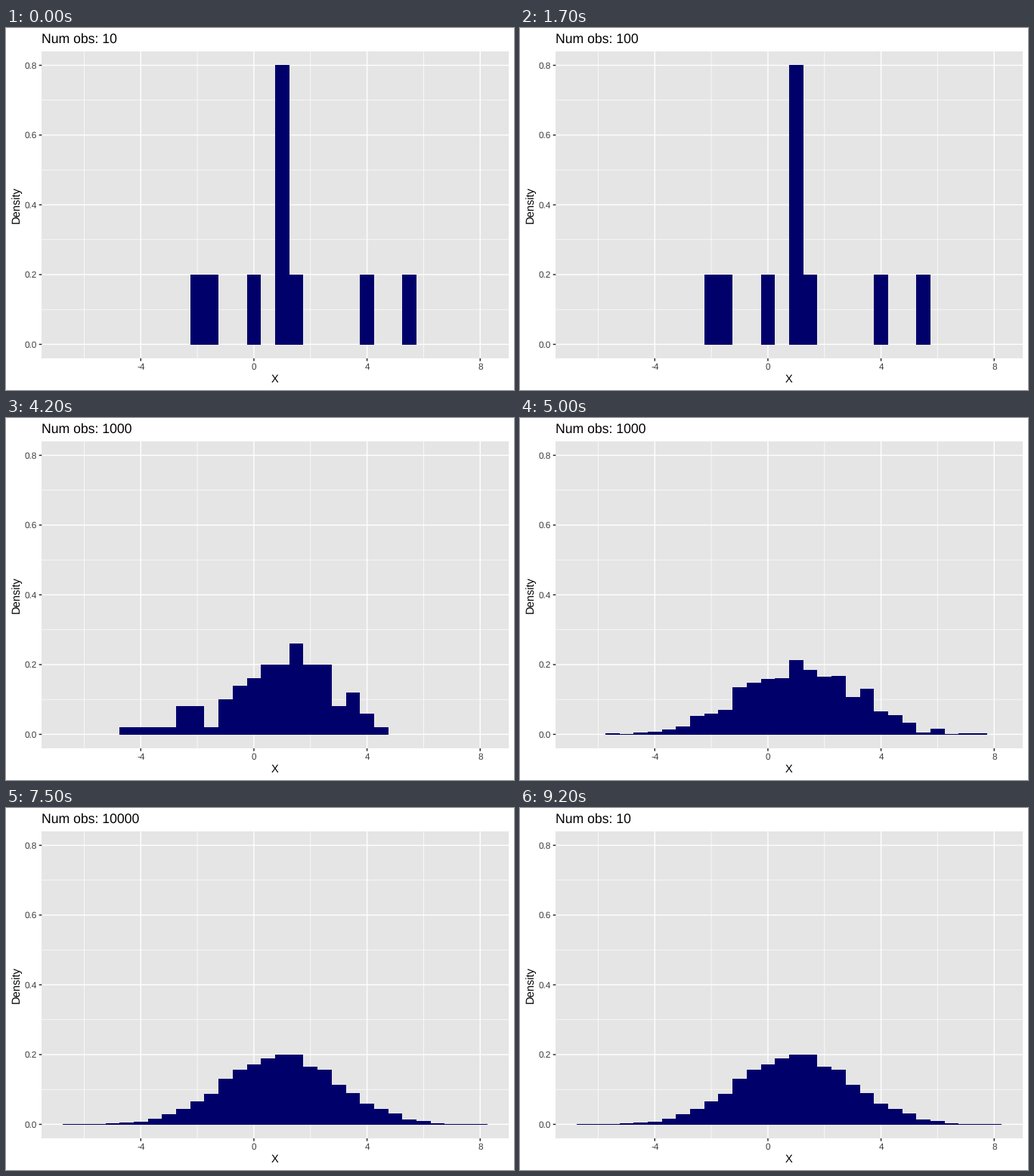
Animation, 672 px wide and 480 px high, one loop 10 s. Source, as a matplotlib script:

```python
import matplotlib.pyplot as plt
from matplotlib.animation import FuncAnimation
from matplotlib.collections import PolyCollection
from matplotlib.patches import Rectangle

WIDTH, HEIGHT, DPI = 672, 480, 96
STEP_MS, LOOP_MS = 100, 10000
LEFT, RIGHT, TOP, BOTTOM = 47, 665, 31, 438
BIN = 0.5
NAVY, PANEL, TICK, LABEL = "#00006b", "#e5e5e5", "#222222", "#3c3c3c"

plt.rcParams["font.family"] = "Liberation Sans"
plt.rcParams["text.hinting"] = "none"

# Sample size, centre of the first bin, observations per bin
SAMPLES = [
    (10, -2, [1, 1, 0, 0, 1, 0, 4, 1, 0, 0, 0, 0, 1, 0, 0, 1]),
    (100, -4.5, [1, 1, 1, 1, 4, 4, 1, 5, 7, 8, 10, 10, 13, 10, 10, 4, 6, 3, 1]),
    (1000, -5.5, [2, 1, 3, 4, 7, 11, 26, 30, 35, 68, 74, 79, 81, 106, 92, 83,
                  84, 53, 65, 33, 28, 17, 3, 8, 1, 2, 2]),
    (10000, -6.5, [3, 4, 8, 15, 25, 40, 80, 145, 225, 330, 440, 655, 785, 860,
                   945, 1000, 1000, 825, 785, 570, 450, 300, 225, 155, 70, 50,
                   15, 5, 5, 2]),
]
TITLE_CHANGES = [1700, 4200, 6700, 9200]


def px(x):
    return 327.95 + 37.413 * x


def py(density):
    return 419.47 - 462.5 * density


fig = plt.figure(figsize=(WIDTH / DPI, HEIGHT / DPI), dpi=DPI, facecolor="white")
ax = fig.add_axes([0, 0, 1, 1])
ax.set_xlim(0, WIDTH)
ax.set_ylim(HEIGHT, 0)
ax.axis("off")


def line(xs, ys, width, color, zorder):
    ax.plot(xs, ys, color=color, lw=width * 72 / DPI, zorder=zorder,
            solid_capstyle="butt", snap=False)


def label(x, y, text, points, color="black", **kw):
    return ax.text(x, y, text, fontsize=points, color=color,
                   va=kw.pop("va", "baseline"), **kw)


def histogram(size, first, counts):
    bars = []
    for i, count in enumerate(counts):
        if count:
            centre = first + i * BIN
            x0, x1 = (round(px(centre + side * BIN / 2)) for side in (-1, 1))
            top = min(419, round(py(count / (size * BIN))))
            bars.append([(x0, top), (x1, top), (x1, 420), (x0, 420)])
    return ax.add_collection(
        PolyCollection(bars, facecolors=NAVY, linewidths=0, zorder=4),
        autolim=False)


ax.add_patch(Rectangle((LEFT, TOP), RIGHT - LEFT, BOTTOM - TOP,
                       facecolor=PANEL, lw=0, zorder=1))

for x in (-6, -2, 2, 6):
    line([px(x)] * 2, [TOP, BOTTOM], 0.71, "white", 2)
for y in (0.1, 0.3, 0.5, 0.7):
    line([LEFT, RIGHT], [py(y)] * 2, 0.71, "white", 2)
for x in (-4, 0, 4, 8):
    line([px(x)] * 2, [TOP, BOTTOM], 1.42, "white", 3)
    line([px(x)] * 2, [BOTTOM, BOTTOM + 3.67], 1.42, TICK, 3)
    label(px(x), 453, str(x), 8.8, LABEL, ha="center")
for y in (0, 0.2, 0.4, 0.6, 0.8):
    line([LEFT, RIGHT], [py(y)] * 2, 1.42, "white", 3)
    line([LEFT - 3.3, LEFT + 0.35], [py(y)] * 2, 1.42, TICK, 3)
    label(40.8, py(y) + 4.2, f"{y:.1f}", 8.8, LABEL, ha="right")

label(356, 470, "X", 11, ha="center")
label(18, 234.5, "Density", 11, rotation=90, ha="right", va="center",
      rotation_mode="default").set(ha="center", va="baseline",
                                   rotation_mode="anchor")
title = label(47.3, 20, "", 13.2, ha="left")
histograms = [histogram(*sample) for sample in SAMPLES]


def draw(frame):
    now = frame * STEP_MS
    shown = now * len(SAMPLES) // LOOP_MS
    named = sum(now >= change for change in TITLE_CHANGES) % len(SAMPLES)
    for i, bars in enumerate(histograms):
        bars.set_visible(i == shown)
    title.set_text(f"Num obs: {SAMPLES[named][0]}")
    return [title, *histograms]


anim = FuncAnimation(fig, draw, frames=LOOP_MS // STEP_MS, interval=STEP_MS,
                     init_func=lambda: draw(0), repeat=True, repeat_delay=0)
plt.show()
```
